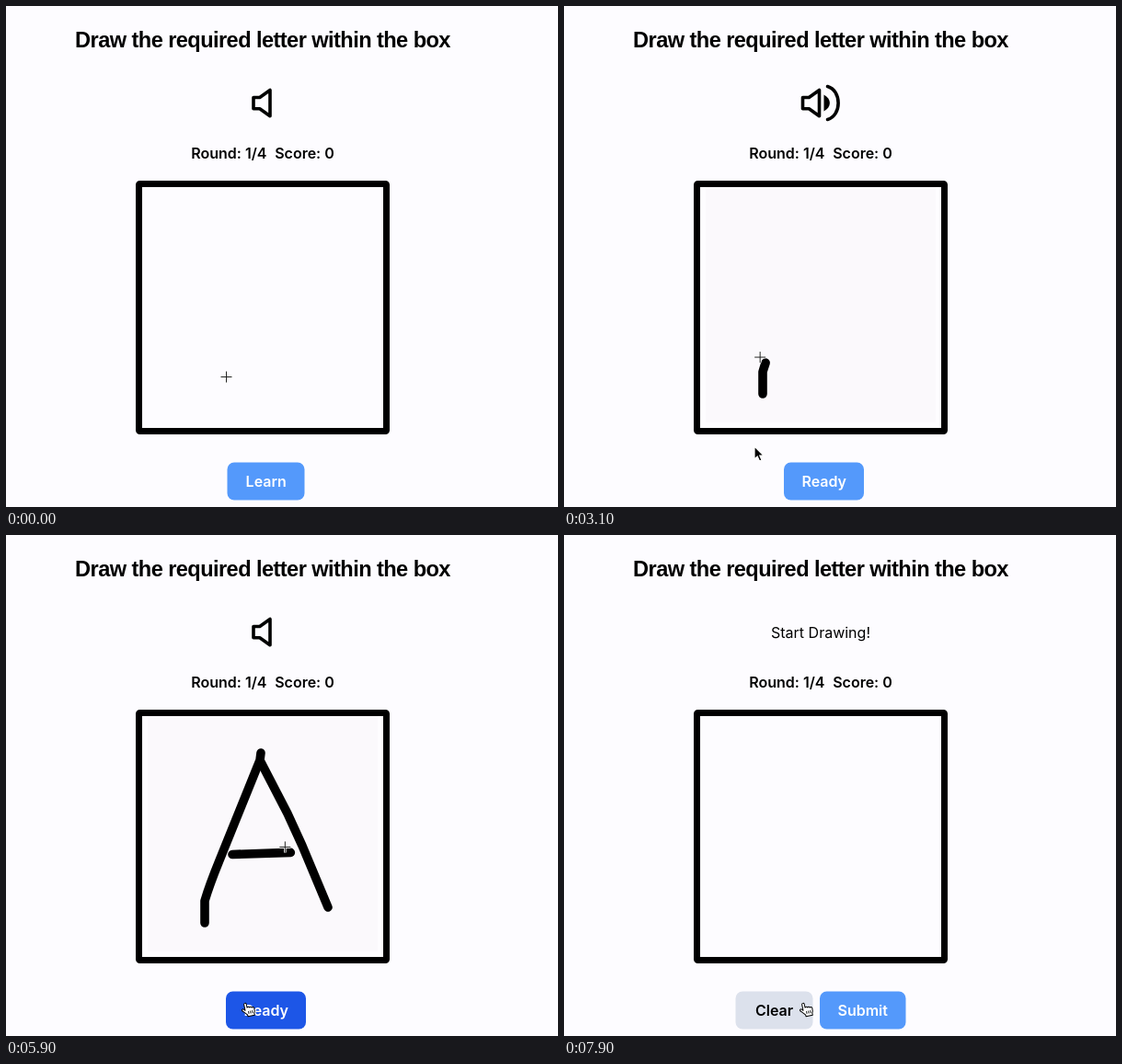
Animation, 600 px wide and 545 px high, one loop 8 s. Source, as an HTML page:

```html
<!DOCTYPE html>
<html lang="en">
<head>
<meta charset="utf-8">
<title>Draw the letter</title>
<style>
  html, body { margin: 0; width: 100%; height: 100%; overflow: hidden; background: #fdfcff; }
  svg { display: block; }
  text { font: 600 16px Inter, "Liberation Sans", sans-serif; text-anchor: middle; }
  #title { font: 700 23.6px "Liberation Sans", sans-serif; letter-spacing: -.57px; }
  #hint { font-weight: 400; }
  .line, .ink { fill: none; stroke: #000; stroke-linejoin: round; stroke-linecap: round; }
  .line { stroke-width: 3.6; }
  .ink { stroke-width: 9.6; }
  .light { fill: #fff; }
</style>
</head>
<body>
<svg width="600" height="545" viewBox="0 0 600 545">
  <defs>
    <g id="cross" fill="none">
      <path d="M-6 0H6M0-6V6" stroke="#fff" stroke-width="2.6"/>
      <path d="M-6 0H6M0-6V6" stroke="#222"/>
    </g>
    <path id="arrow" d="M0 0V14L3.200 11L5.500 16L8 15L5.800 10H10Z" stroke="#fff" stroke-width="1.2"/>
    <g id="hand" transform="rotate(-12)" fill="#fff" stroke="#000" stroke-linejoin="round">
      <path d="M-1.6 1C-1.6-.6 1-.6 1 1V5C1.4 4 3.4 4 3.6 5.3C4.2 4.5 6 4.6 6.2 6C7 5.4 8.4 5.6 8.5 7C8.6 10 8.4 11 7.4 12.5V14.5H0V13C-1 11.5-3.4 9-4.8 7.4C-5.6 6-3.8 5-2.6 6.4L-1.6 7.6Z"/>
      <path d="M1.6 9V12M3.7 9V12M5.8 9V12" stroke-width=".8"/>
    </g>
  </defs>

  <text id="title" x="279" y="44.8">Draw the required letter within the box</text>
  <path id="speaker" class="line" d="M269 99.5H275.8L287 91.5V119.8L275.8 111.8H269Z"/>
  <g id="waves">
    <path d="M282.5 96.5C291 101 291 110 282.5 114.5Z"/>
    <path class="line" d="M286.5 87.5C302 92 302 119 286.5 123.5"/>
  </g>
  <text id="hint" x="279" y="111.5">Start Drawing!</text>
  <text x="242.3" y="166">Round: 1/4</text>
  <text x="324.5" y="166">Score: 0</text>

  <rect x="144.5" y="193.5" width="269" height="269" rx="1" fill="none" stroke="#000" stroke-width="7"/>
  <g id="lesson">
    <rect x="148" y="197" width="262" height="262" fill="#fefdff"/>
    <rect x="154" y="197" width="250" height="256" fill="#fbf9fc"/>
    <path class="ink" data-start="2930" data-end="3900" d="M216 422V398Q221 381 232 354L276 245L277 237"/>
    <path class="ink" data-start="4000" data-end="4600" d="M277 247L306 303L322 338L350 405"/>
    <path class="ink" data-start="5400" data-end="6000" d="M246 347.5L322 345"/>
    <use id="pen" href="#cross"/>
  </g>

  <g id="main">
    <rect id="mainBox" y="496.5" height="41" rx="7.5"/>
    <text id="mainText" class="light" x="282.7" y="523"></text>
  </g>
  <g id="choices">
    <rect x="186.5" y="496.5" width="84" height="41" rx="7.5" fill="#dce1ec"/>
    <rect x="278" y="496.5" width="93.5" height="41" rx="7.5" fill="#5499fb"/>
    <text x="228.5" y="523">Clear</text>
    <text class="light" x="324.7" y="523">Submit</text>
  </g>
  <use id="mouse"/>
</svg>
<script>
const LOOP = 8000, STEP = 100, MOVE = 700;
const READY = 1800, PLAY = 2200, MUTE = 5300, REPLAY = 7400, START = 7700;
const $ = id => document.getElementById(id);
const ramp = (t, start, end) => Math.min(1, Math.max(0, (t - start) / (end - start)));
const mix = (a, b, f) => ({ x: a.x + (b.x - a.x) * f, y: a.y + (b.y - a.y) * f });
const show = (el, on) => el.setAttribute('visibility', on ? 'inherit' : 'hidden');
const place = (el, p) => el.setAttribute('transform', `translate(${p.x} ${p.y})`);

const mouseHome = { x: 239.5, y: 403.5 };
const mouseStops = [
  { start: 400, x: 276, y: 512 },
  { start: 2200, x: 207, y: 479 },
  { start: 4900, x: 260, y: 509.5 }
];
const penHome = { x: 201.5, y: 420.5 };
const strokes = [...document.querySelectorAll('.ink')].map(path => ({
  path, start: +path.dataset.start, end: +path.dataset.end, length: path.getTotalLength()
}));

const mouseAt = t => mouseStops.reduce(
  (p, stop) => mix(p, stop, ramp(t, stop.start, stop.start + MOVE)), mouseHome);

// Follows each stroke and travels straight from one to the next
function penAt(t) {
  let p = penHome;
  for (const { path, start, end, length } of strokes) {
    p = mix(p, path.getPointAtLength(0), ramp(t, start - 400, start));
    if (t >= start) p = path.getPointAtLength(length * ramp(t, start, end));
  }
  return { x: p.x - 6, y: p.y - 6 };
}

function drawLesson(t) {
  for (const { path, start, end, length } of strokes) {
    show(path, t > start);
    path.setAttribute('stroke-dasharray', `${length * ramp(t, start, end)} ${length + 20}`);
  }
  place($('pen'), penAt(t));
}

function draw(t) {
  const ready = t >= READY, started = t >= START, loud = t >= PLAY && t < MUTE;
  show($('speaker'), !started);
  show($('waves'), loud);
  place($('speaker'), { x: loud ? -9.5 : 0, y: 0 });
  show($('hint'), started);
  show($('lesson'), t >= PLAY && !started);
  drawLesson(started ? 0 : t >= REPLAY ? t - REPLAY + PLAY : t);

  const mouse = mouseAt(t);
  const left = ready ? 239 : 240.5, width = ready ? 87 : 84;
  const over = mouse.y > 496 && mouse.x > left && mouse.x < left + width;
  show($('main'), !started);
  show($('choices'), started);
  $('mainBox').setAttribute('x', left);
  $('mainBox').setAttribute('width', width);
  $('mainBox').setAttribute('fill', over ? '#1d56e7' : '#5499fb');
  $('mainText').textContent = ready ? 'Ready' : 'Learn';

  $('mouse').setAttribute('href', over ? '#hand' : mouse.y < 466 ? '#cross' : '#arrow');
  place($('mouse'), mouse);
}

function tick(now) {
  draw(Math.floor(now % LOOP / STEP) * STEP);
  requestAnimationFrame(tick);
}
draw(0);
requestAnimationFrame(tick);
</script>
</body>
</html>
```
